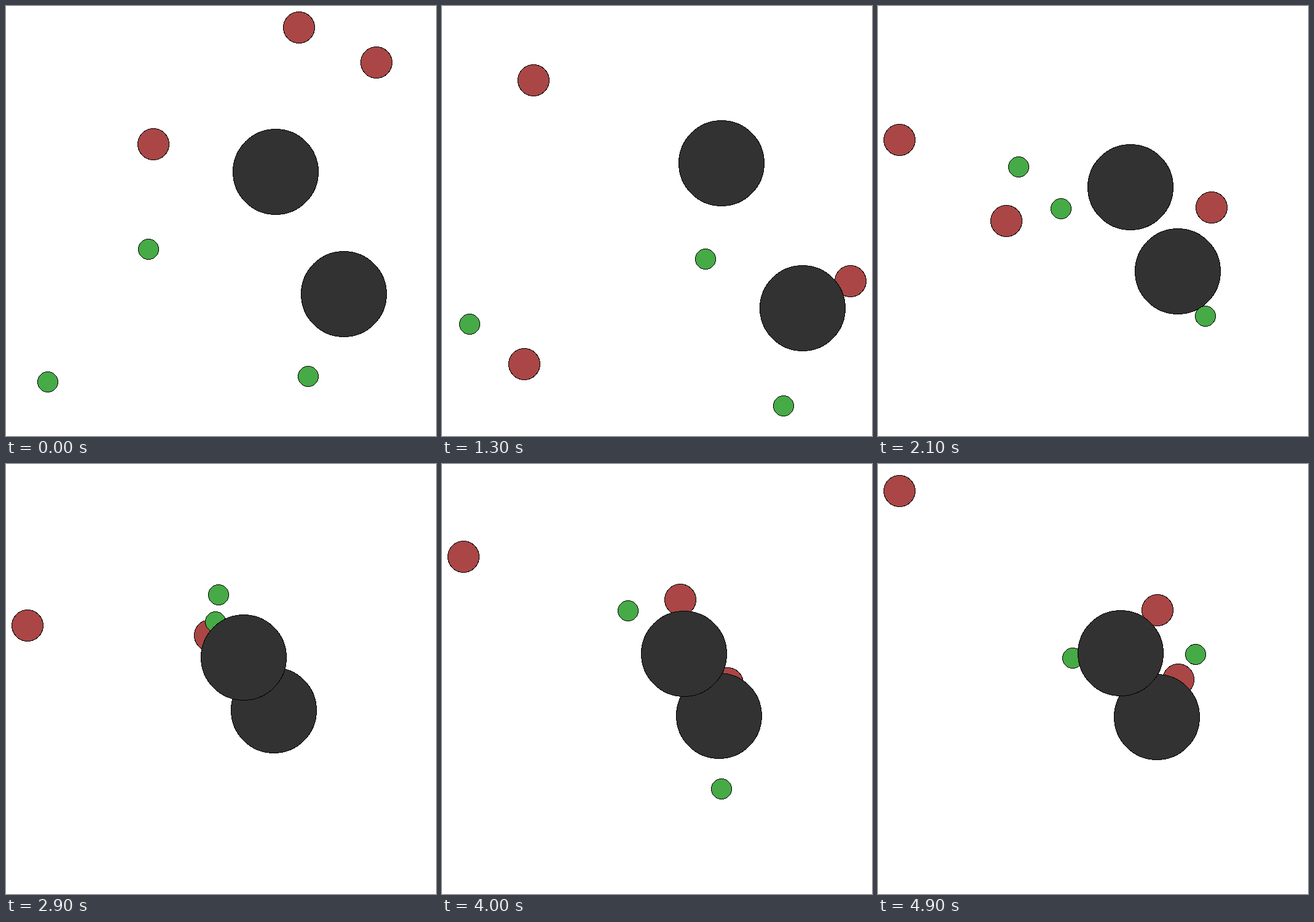
Write an HTML page that moves like this. It is 700 px wide and 700 px high and loops after 5000 ms.

```html
<!DOCTYPE html>
<html lang="en">
<head>
<meta charset="utf-8">
<title>Drifting balls</title>
<style>
  html, body { margin: 0; width: 100%; height: 100%; overflow: hidden; background: #fff; }
  svg { display: block; width: 700px; height: 700px; }
  circle { stroke: #000; stroke-width: 1; shape-rendering: crispEdges; }
  .red { fill: #aa4646; }
  .green { fill: #46aa46; }
  .dark { fill: #323232; }
</style>
</head>
<body>
<svg id="stage" viewBox="0 0 700 700"></svg>
<script>
const LOOP = 5000, STEP = 100, MIN = 35, MAX = 665;
const RADIUS = { red: 25.5, green: 16.5, dark: 69.5 };
const TURNS = [0, 7, 13, 21, 29, 40, 49];   // steps at which every path has a key point
const stage = document.getElementById('stage');

// Smooth curve through one value per turn
function curve(values, t) {
  const last = TURNS.length - 1;
  let i = 0;
  while (i < last - 1 && t >= TURNS[i + 1]) i++;
  const slope = j => {
    const a = Math.max(j - 1, 0), b = Math.min(j + 1, last);
    return (values[b] - values[a]) / (TURNS[b] - TURNS[a]);
  };
  const h = TURNS[i + 1] - TURNS[i], u = (t - TURNS[i]) / h, v = 1 - u;
  return v * v * (1 + 2 * u) * values[i] + u * u * (3 - 2 * u) * values[i + 1]
    + h * u * v * (v * slope(i) - u * slope(i + 1));
}

// Key points may lie past a wall: the ball then slides along it
const clamp = v => Math.min(MAX, Math.max(MIN, v));
const along = (xs, ys) => t => [clamp(curve(xs, t)), clamp(curve(ys, t))];

// The dark balls move on rays, sharing one distance factor
const spread = t => curve([1, 1.08, 1.186, 0.69, 0.43, 0.505, 0.52], t);
const ray = (x, y, dx, dy) => t => [x + dx * spread(t), y + dy * spread(t)];

function ball(kind, place) {
  const el = document.createElementNS('http://www.w3.org/2000/svg', 'circle');
  el.setAttribute('class', kind);
  el.setAttribute('r', RADIUS[kind]);
  stage.append(el);
  return { el, place };
}

const balls = [
  ball('red', along([477, 389, 149, -10, 35, 35, 35], [35, 114, 121, 218, 263, 151, 44])),
  ball('red', along([603, 680, 690, 543, 440, 465, 489], [92, 234, 448, 328, 366, 357, 351])),
  ball('red', along([240, 231, 134, 209, 332, 388, 455], [225, 418, 583, 350, 279, 221, 238])),
  ball('green', along([232, 164, 45, 229, 346, 430, 425], [396, 560, 518, 262, 213, 325, 365])),
  ball('green', along([68, 289, 556, 533, 440, 455, 517], [612, 660, 651, 505, 425, 529, 310])),
  ball('green', along([492, 435, 429, 298, 341, 303, 317], [603, 523, 412, 330, 257, 239, 316])),
  ball('dark', ray(350, 349.2, 200, 120)),
  ball('dark', ray(348.8, 348.4, 89.8, -78)),
];

function draw(t) {
  for (const { el, place } of balls) {
    const [x, y] = place(t);
    el.setAttribute('cx', Math.round(x));
    el.setAttribute('cy', Math.round(y));
  }
}

const start = performance.now();
function tick() {
  draw(Math.floor(((performance.now() - start) % LOOP) / STEP));
  requestAnimationFrame(tick);
}
tick();
</script>
</body>
</html>
```
